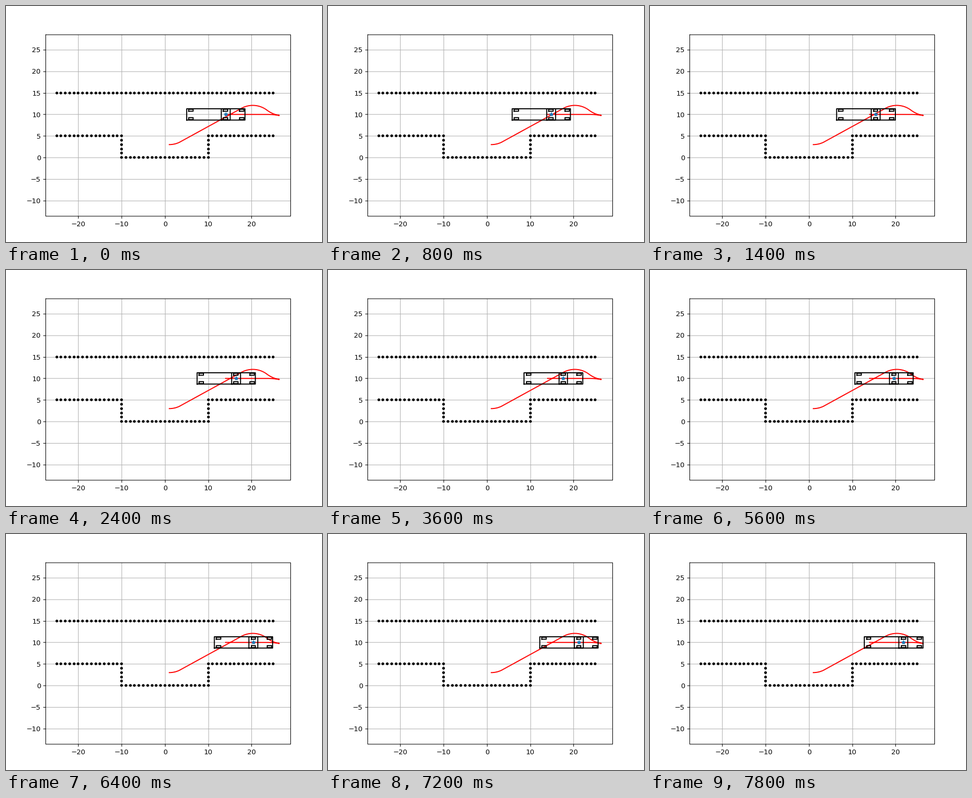
These frames come from a looping animation (600 by 450 pixels, 8 s). A matplotlib script:

```python
import numpy as np
import matplotlib.pyplot as plt
from matplotlib.animation import FuncAnimation
from matplotlib.collections import PatchCollection
from matplotlib.patches import Circle, Polygon
from matplotlib.path import Path

FRAMES, INTERVAL = 40, 200
STEP = 0.2                 # metres driven per frame
START = (14.0, 10.0)

# Vehicle dimensions in metres
W, WB = 2.6, 3.7           # width, wheel base
LF, LB = 4.5, 1.0          # truck: rear axle to front and back
LTF, LTB, LT = 1.0, 9.0, 8.0   # trailer: hitch to front, back, wheels
TR, TW = 0.5, 1.0          # wheel radius, half track

# The plot is laid out on a 640 x 480 grid that fills the figure
GW, GH = 640, 480
LEFT, RIGHT, TOP, BOTTOM = 80, 576, 57.6, 427.2
PT = 100 / 72              # one point in grid units


def drive(x, y, parts):
    """Bicycle model; parts are (signed distance, steering angle)."""
    pts, yaw = [(x, y)], 0.0
    for dist, steer in parts:
        n = 40
        ds = dist / n
        da = ds * np.tan(steer) / WB
        for _ in range(n):
            x += ds * np.cos(yaw + da / 2)
            y += ds * np.sin(yaw + da / 2)
            yaw += da
            pts.append((x, y))
    return np.array(pts)


def box(x0, x1, y0, y1):
    return np.array([(x0, y0), (x1, y0), (x1, y1), (x0, y1), (x0, y0)])


def wheel(x, y):
    return box(x - TR, x + TR, y - W / 12, y + W / 12)


def dots(x0, y0, x1, y1):
    n = int(max(abs(x1 - x0), abs(y1 - y0))) + 1
    return np.column_stack([np.linspace(x0, x1, n), np.linspace(y0, y1, n)])


route = drive(*START, [(9.3, 0), (3.1, -0.18), (-3.1, 0.54), (-6.266, -0.6),
                       (-16.04, 0), (-2.725, 0.6)])

walls = np.vstack([
    dots(-25, 15, 25, 15),
    dots(-25, 5, -10, 5),
    dots(-10, 4, -10, 1),
    dots(-10, 0, 10, 0),
    dots(10, 1, 10, 4),
    dots(10, 5, 25, 5),
])

shapes = [box(-LB, LF, -W / 2, W / 2), box(-LTB, LTF, -W / 2, W / 2)]
shapes += [wheel(x, y) for x in (0, WB, -LT) for y in (TW, -TW)]

# Equal scale on both axes with a 5 % margin in x
x_max = route[:, 0].max()
x_left = -25 - 0.05 * (x_max + 25)
scale = (RIGHT - LEFT) / (1.1 * (x_max + 25))


def to_grid(pts):
    x, y = np.asarray(pts, float).T
    return np.column_stack([LEFT + (x - x_left) * scale,
                            (TOP + BOTTOM) / 2 - (y - 7.5) * scale])


def snap(v, shift=0.0):
    return np.floor(np.asarray(v) + 0.5) + shift


fig = plt.figure(figsize=(6.4, 4.8), dpi=93.75)
ax = fig.add_axes([0, 0, 1, 1])
ax.set_xlim(0, GW)
ax.set_ylim(GH, 0)
ax.axis("off")


def stroke(x, y, color="k", lw=0.8, **style):
    return ax.plot(x, y, color=color, lw=lw, snap=False, **style)[0]


# Frame, grid, ticks and labels
l, r, t, b = snap([LEFT, RIGHT, TOP, BOTTOM], 0.5)
stroke(*box(l, r, t, b).T, zorder=3)
flat = dict(solid_capstyle="butt")
pad = 7 * PT
for v in range(-20, 21, 10):
    x = to_grid([(v, 0)])[0, 0]
    gx = snap(x, 0.5)
    stroke([gx, gx], [t, b], "#b0b0b0", zorder=0, **flat)
    stroke([gx, gx], [b, b + 5], **flat)
    ax.text(x, BOTTOM + pad, f"{v}".replace("-", "\u2212"), size=10,
            ha="center", va="top")
for v in range(-10, 26, 5):
    y = to_grid([(0, v)])[0, 1]
    gy = snap(y, 0.5)
    stroke([l, r], [gy, gy], "#b0b0b0", zorder=0, **flat)
    stroke([l - 5, l], [gy, gy], **flat)
    ax.text(LEFT - pad, y, f"{v}".replace("-", "\u2212"), size=10,
            ha="right", va="center_baseline")

ax.add_collection(PatchCollection(
    [Circle(p, 2 * PT) for p in snap(to_grid(walls))], fc="k", lw=0))
stroke(*to_grid(route).T, color="r", lw=1.5)
outlines = [stroke([], [], lw=1.5) for _ in shapes]

star = Path.unit_regular_star(5, 0.381966).vertices * (1, -1) * 3 * PT
star = snap(star, 0.5)
hitch = ax.add_patch(Polygon(star, fc="C0", ec="C0", lw=1, snap=False,
                             joinstyle="bevel", zorder=2.5))


def update(i):
    pos = np.array([START[0] + STEP * i, START[1]])
    for line, shape in zip(outlines, shapes):
        line.set_data(*snap(to_grid(shape + pos)).T)
    hitch.set_xy(star + snap(to_grid([pos])))
    return outlines + [hitch]


anim = FuncAnimation(fig, update, frames=FRAMES, interval=INTERVAL,
                     repeat=True, repeat_delay=0)
plt.show()
```
